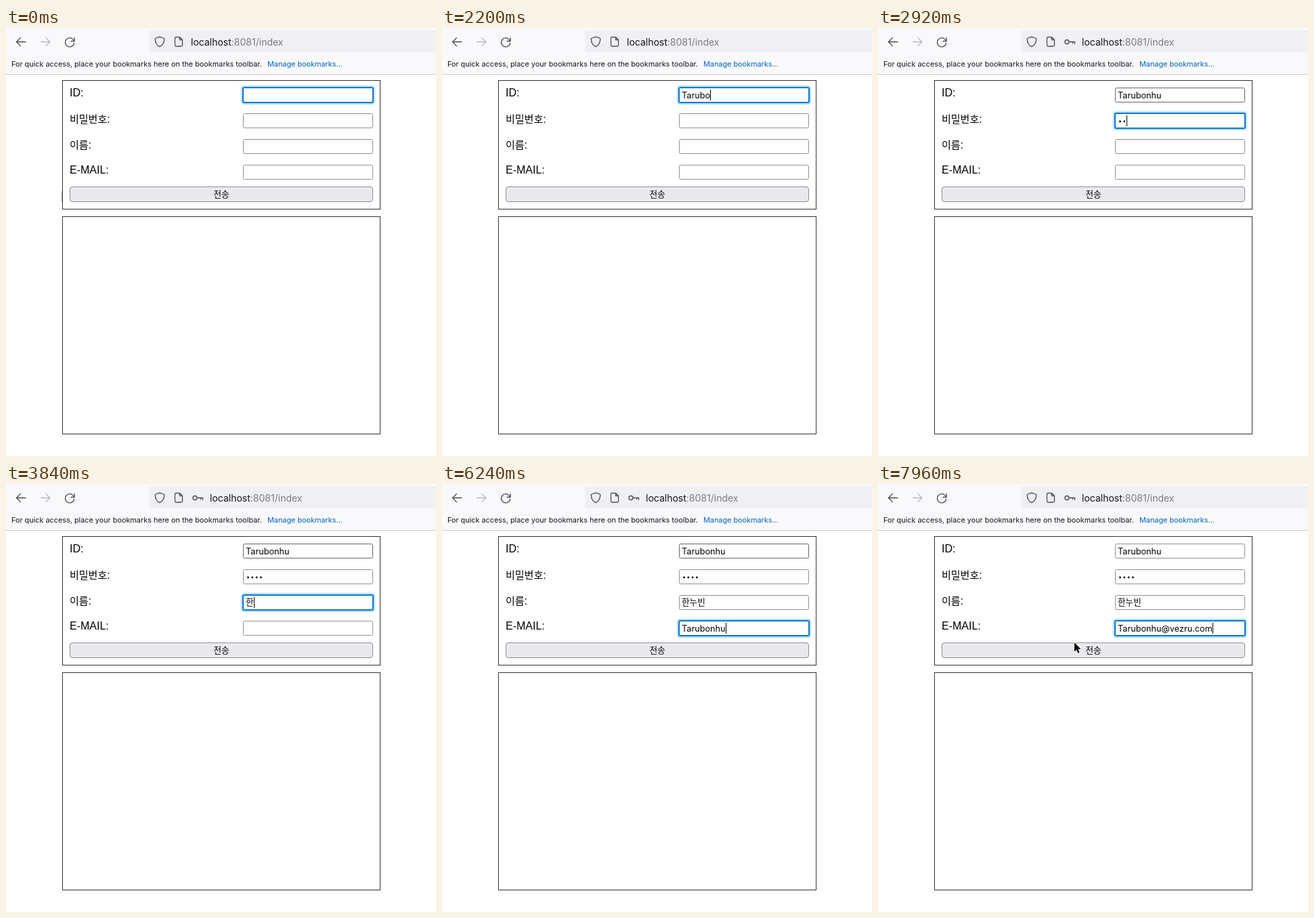
Animation, 635 px wide and 632 px high, one loop 8 s. Source, as an HTML page:

```html
<!DOCTYPE html>
<html lang="ko">
<head>
<meta charset="utf-8">
<title>Sign-up form</title>
<style>
  html, body { margin: 0; width: 100%; height: 100%; overflow: hidden; background: #fff; }
  svg { display: block; }
  text { font-family: Inter, "Noto Sans CJK KR", sans-serif; white-space: pre; }
  .label { font: 16px "Liberation Sans", Arial, sans-serif; }
  .ko { font: 15px "Noto Sans CJK KR", sans-serif; }
  .small { font: 12.6px "Noto Sans CJK KR", sans-serif; }
  .value { font-size: 12.7px; }
  .icon { fill: none; stroke: #4b4b52; stroke-width: 1.3; stroke-linecap: round; stroke-linejoin: round; }
  .box { fill: #fff; stroke: #333; }
</style>
</head>
<body>
<svg width="635" height="632" viewBox="0 0 635 632">
  <rect width="635" height="68" fill="#f9f9fb"/>
  <rect y="68" width="635" height="1" fill="#ccccd0"/>
  <rect x="211" y="4" width="440" height="32" rx="4" fill="#f0f0f4"/>
  <g class="icon">
    <path d="M29 20.5H15.5M21.5 14.5l-6 6 6 6"/>
    <path d="M51.500 20.5H65M59 14.500l6 6-6 6" stroke="#b9b9bf"/>
    <path d="M100.300 19A6.600 6.600 0 1 0 100.600 22.200M101 14.500v5h-5"/>
    <path d="M227 12.800l6.800 2.700c0 6-1.500 9.700-6.800 12.200-5.300-2.500-6.800-6.200-6.800-12.200z"/>
    <path d="M251 13.500h5.500l4 4v8a1.500 1.500 0 0 1-1.500 1.500h-8a1.500 1.500 0 0 1-1.500-1.500v-10.500a1.500 1.500 0 0 1 1.500-1.500zM256.500 13.500v4h4"/>
    <path id="key" d="M282 20.500a3 3 0 1 0-6 0 3 3 0 0 0 6 0h8.500v3M287.500 20.500v2"/>
  </g>
  <text id="url" x="273" y="26" font-size="14" fill="#15141a">localhost<tspan fill="#7b7b82">:8081/index</tspan></text>
  <text x="8" y="57" font-size="10.85" fill="#15141a">For quick access, place your bookmarks here on the bookmarks toolbar.</text>
  <text x="386" y="57" font-size="10.85" fill="#0061c2">Manage bookmarks…</text>

  <rect class="box" x="83.5" y="77.5" width="469" height="190"/>
  <rect class="box" x="83.5" y="278.5" width="469" height="321"/>
  <text class="label" x="94" y="101">ID:</text>
  <text class="label" x="94" y="140"><tspan class="ko">비밀번호</tspan>:</text>
  <text class="label" x="94" y="178"><tspan class="ko">이름</tspan>:</text>
  <text class="label" x="94" y="215">E-MAIL:</text>
  <g id="fields"></g>
  <rect x="94.5" y="234.500" width="447" height="22" rx="3.5" fill="#e9e9ed" stroke="#8f8f9d"/>
  <text class="small" x="318" y="250" text-anchor="middle">전송</text>

  <rect id="caret" width="1" height="16"/>
  <rect id="mark" x="82" width="1" height="16" fill="#aaa"/>
  <path id="beam" d="M-3 -9q3 0 3 3v12q0 3 -3 3M3 -9q-3 0 -3 3v12q0 3 3 3" fill="none" stroke="#000"/>
  <path id="arrow" d="M0 0V13.500L3.100 10.700 5.300 15.800 7.600 14.800 5.400 9.800H9.600Z" stroke="#fff" stroke-width="1.6" paint-order="stroke"/>
</svg>
<script>
const $ = id => document.getElementById(id);
const LOOP = 8000, STEP = 40, LEFT = 354;
const ROWS = [88, 126, 164, 202];

// Each field: the time of every keystroke and the text after it.
const prefixes = s => [...s].map((_, i) => s.slice(0, i + 1));
const fields = [
  { times: [1600, 1760, 1880, 2080, 2120, 2200, 2320, 2360, 2440], states: prefixes('Tarubonhu') },
  { times: [2760, 2880, 3040, 3160], states: prefixes('••••') },
  { times: [3640, 3720, 3800, 3880, 3960, 4040, 4120, 4200],
    states: ['ㅎ', '하', '한', '한ㄴ', '한누', '한눕', '한누비', '한누빈'] },
  { times: [5200, 5400, 5600, 5760, 5840, 5920, 6000, 6080, 6160, 6320, 6400,
            6680, 6800, 6880, 6960, 7080, 7200, 7280, 7400],
    states: prefixes('Tarubonhu@vezru.com') }
];
const focusTimes = [0, 2520, 3520, 4280];
const caretOff = [[0, 680], [1120, 1320], [4640, 5000]];
const marks = [[0, 241], [5000, 288], [5840, 288], [6680, 288]];

$('fields').innerHTML = ROWS.map((y, i) => `
  <rect x="348" y="${y - 2}" width="196" height="26" rx="4" fill="none" stroke="#b9e1fb" stroke-width="2.5"/>
  <rect fill="#fff"/>
  <text class="${i === 2 ? 'small' : 'value'}" x="${LEFT}" y="${y + (i === 2 ? 15 : 16)}"></text>
  <g>${[0, 1, 2, 3].map(k => `<circle cx="${357.5 + 6.3 * k}" cy="${y + 12}" r="1.4"/>`).join('')}</g>`).join('');
const parts = [...$('fields').children];

const set = (el, attrs) => { for (const k in attrs) el.setAttribute(k, attrs[k]); };
const show = (el, on) => { el.style.display = on ? '' : 'none'; };
const within = (t, a, b) => t >= a && t < b;
const mix = (a, b, f) => a.map((v, i) => v + (b[i] - v) * f);
const ease = f => f * f * (3 - 2 * f);

function pointer(t) {
  if (within(t, 40, 680)) {
    const f = ease(Math.min(1, (t - 40) / 480)), bend = [120, 430];
    return mix(mix([51, 18], bend, f), mix(bend, [382, 110], f), f);
  }
  if (within(t, 680, 800)) return mix([382, 110], [381, 117], (t - 680) / 120);
  if (within(t, 800, 920)) return mix([381, 117], [382, 108], (t - 800) / 120);
  if (t >= 7680) return mix([382, 108], [290, 234], ease(Math.min(1, (t - 7680) / 280)));
  return null;
}

function drawField(i, t, focused) {
  const [ring, frame, label, dots] = parts.slice(i * 4, i * 4 + 4);
  const { times, states } = fields[i];
  const count = times.filter(k => t >= k).length;
  const hovered = i === 0 && within(t, 480, 7720);
  const grow = focused ? 0 : 0.5;
  show(ring, focused);
  set(frame, {
    x: 350 + grow, y: ROWS[i] + grow, width: 192 - 2 * grow, height: 22 - 2 * grow, rx: 2,
    stroke: focused ? '#0a78d1' : hovered ? '#676774' : '#8f8f9d', 'stroke-width': focused ? 2 : 1
  });
  const secret = i === 1;
  label.textContent = count && !secret ? states[count - 1] : '';
  [...dots.children].forEach((dot, k) => show(dot, secret && k < count));
  if (focused) {
    const width = secret ? 6.3 * count : count ? label.getComputedTextLength() : 0;
    set($('caret'), { x: Math.round(LEFT + width), y: ROWS[i] + 3 });
  }
}

function draw(t) {
  const active = focusTimes.filter(k => t >= k).length - 1;
  fields.forEach((_, i) => drawField(i, t, i === active));
  show($('caret'), !caretOff.some(([a, b]) => within(t, a, b)));

  const secure = t >= 2760;
  show($('key'), secure);
  set($('url'), { x: secure ? 301 : 273 });

  const mark = marks.find(([a]) => within(t, a, a + STEP));
  show($('mark'), mark);
  if (mark) set($('mark'), { y: mark[1] });

  const p = pointer(t);
  show($('arrow'), p);
  if (p) set($('arrow'), { transform: `translate(${p})` });
  show($('beam'), within(t, 920, 1600));
  set($('beam'), { transform: 'translate(386.5 104)' });
}

const start = performance.now();
function tick(now) {
  const t = Math.max(0, now - start) % LOOP;
  draw(Math.floor(t / STEP) * STEP);
  requestAnimationFrame(tick);
}
draw(0);
requestAnimationFrame(tick);
</script>
</body>
</html>
```
